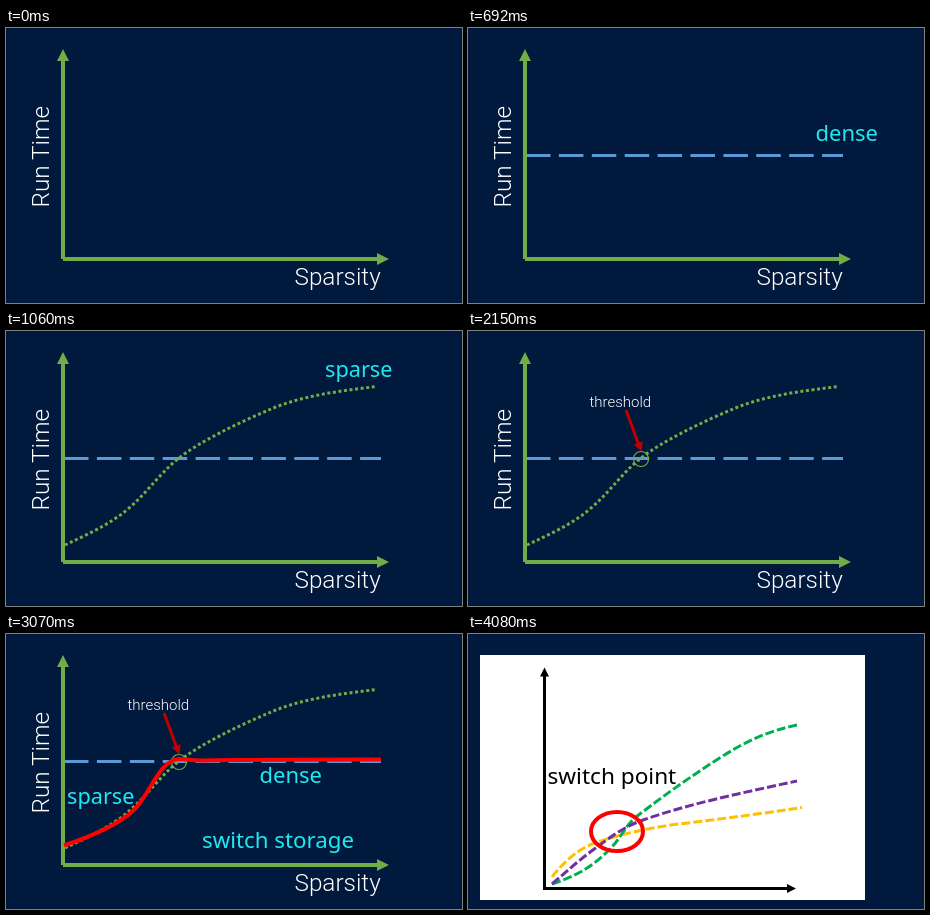
Write an HTML page that moves like this. It is 456x275 px and loops after 4.92 s.

```html
<!DOCTYPE html>
<html lang="en">
<head>
<meta charset="utf-8">
<title>Run time against sparsity</title>
<style>
  html, body { margin: 0; width: 100%; height: 100%; overflow: hidden; background: #00193c; }
  svg { display: block; width: 456px; height: 275px; }
  text { font: 22px "Noto Sans", "Open Sans", sans-serif; fill: #1fe9f0; }
  .light { font: 300 24.3px Roboto, sans-serif; fill: #fff; }
  .note { font-size: 15px; }
  .line { fill: none; stroke-width: 3; }
  .dash { stroke-dasharray: 9 3; }

  /* Each step appears at once and stays until its turn ends. */
  .step { visibility: hidden; animation: 4920ms step-end infinite; }
  .baseline { animation-name: baseline; }
  .dense { animation-name: dense; }
  .curve { animation-name: curve; }
  .sparse { animation-name: sparse; }
  .threshold { animation-name: threshold; }
  .switch { animation-name: switch; }
  .summary { animation-name: summary; }

  @keyframes baseline { 0% { visibility: hidden } 2.8455%, 100% { visibility: visible } }
  @keyframes dense { 0%, 21.5447% { visibility: hidden } 2.8455% { visibility: visible } }
  @keyframes curve { 0% { visibility: hidden } 21.5447%, 100% { visibility: visible } }
  @keyframes sparse { 0%, 43.6992% { visibility: hidden } 21.5447% { visibility: visible } }
  @keyframes threshold { 0% { visibility: hidden } 43.6992%, 100% { visibility: visible } }
  @keyframes switch { 0% { visibility: hidden } 62.3984%, 100% { visibility: visible } }
  @keyframes summary { 0% { visibility: hidden } 82.9268%, 100% { visibility: visible } }
</style>
</head>
<body>
<svg viewBox="0 0 456 275">
  <g class="step baseline">
    <path class="line" d="M58 127.5H375" stroke="#5b9bd5" stroke-dasharray="24.5 8.4"/>
  </g>

  <g fill="#70ad47">
    <path d="M57 31V231M57 231H373" fill="none" stroke="#70ad47" stroke-width="4"/>
    <path d="M57 21L63 33H51ZM383 231L371 237V225Z"/>
  </g>
  <text class="light" transform="translate(43 179.5) rotate(-90)">Run Time</text>
  <text class="light" x="288.5" y="257">Sparsity</text>

  <text class="step dense" x="347.5" y="113">dense</text>

  <path class="step curve line" stroke="#70ad47" stroke-dasharray="3 2.6"
    d="M59 214C80 204 103 194 122 178S153 143 173 127S232 92 265 78S335 60 370 55.5"/>
  <text class="step sparse" x="319" y="46" style="font-size:21.7px">sparse</text>

  <g class="step threshold">
    <text class="light note" x="121.5" y="76">threshold</text>
    <circle cx="173" cy="128" r="7.5" fill="none" stroke="#70ad47" stroke-width="1.2"/>
    <path class="line" d="M158 79L170.5 113" stroke="#c00000"/>
    <path d="M173.5 120.5L165.8 113.5L174.8 110.3Z" fill="#c00000"/>
  </g>

  <g class="step switch">
    <path d="M58 211.5C82 203.5 112 191.5 128.5 175.5C144.5 159.5 153 126.5 173 125C182 125 184 126.5 194 126.5C224 125.5 290 125.5 375 125.5"
      fill="none" stroke="#f00" stroke-width="4"/>
    <text x="61" y="170" style="font-size:21.7px">sparse</text>
    <text x="253.5" y="149">dense</text>
    <text x="196" y="214" style="font-size:22.3px">switch storage</text>
  </g>

  <g class="step summary">
    <path d="M12 21H397V266H12Z" fill="#fff"/>
    <path class="line" d="M76.5 41V254.5H321" stroke="#000"/>
    <path d="M76.5 33.5L81 42.5H72ZM328 254.5L319 259V250Z"/>
    <path class="line dash" stroke="#ffc000" d="M84 243C96 228 110 214 130 208C156 199 190 192 220 189C260 184 298 179 334 173.5"/>
    <path class="line dash" stroke="#00b050" d="M84 250C105 243 122 235 140 217C152 206 156 193 168 183C195 162 222 143 250 125S300 97 329 91"/>
    <path class="line dash" stroke="#7030a0" d="M84 250C98 238 110 227 125 216C140 205 155 193 175 186C220 170 278 158 329 147"/>
    <ellipse cx="149" cy="197.5" rx="26" ry="19.5" fill="none" stroke="#f00" stroke-width="4"/>
    <text x="79.5" y="149.5" style="font-size:22.6px;fill:#000">switch point</text>
  </g>
</svg>
</body>
</html>
```
